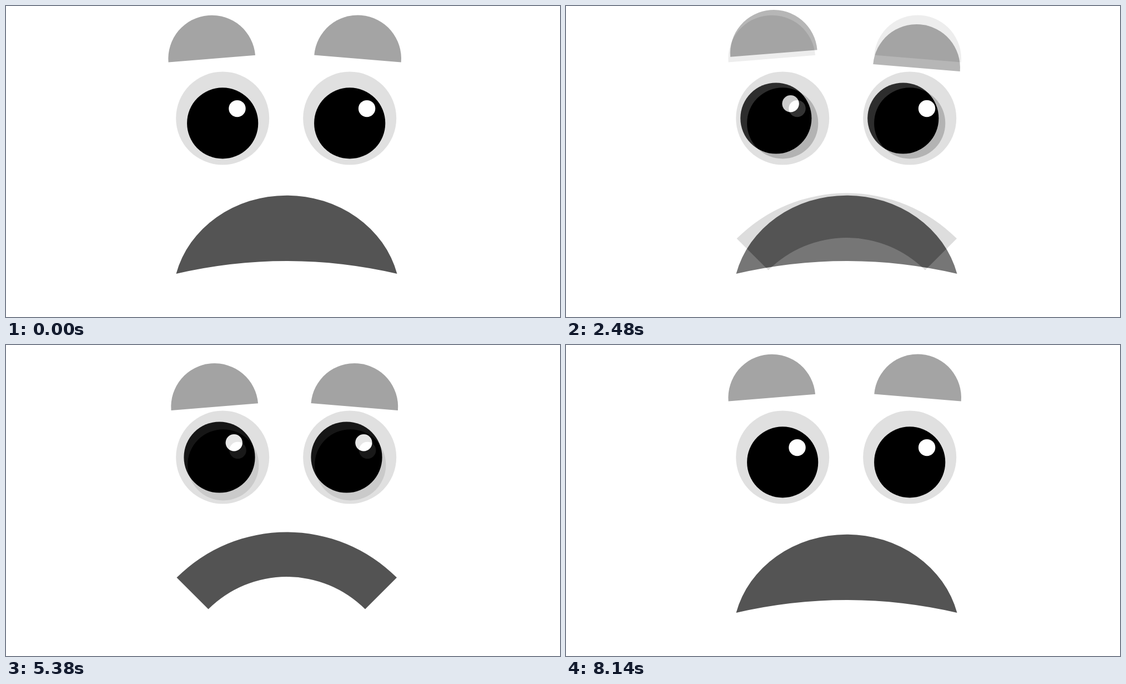
Write an HTML page that moves like this. It is 998 px wide and 561 px high and loops after 8880 ms.

```html
<!DOCTYPE html>
<html lang="en">
<head>
<meta charset="utf-8">
<title>Worried face</title>
<style>
  html, body { margin: 0; width: 100%; height: 100%; overflow: hidden; background: #fff; }
  svg { display: block; width: 998px; height: 561px; }
</style>
</head>
<body>
<svg id="stage" viewBox="0 0 998 561"></svg>
<script>
const LOOP = 8880, FADE = 600;
const EYE_GAP = 229;

const MOUTH = {
  open: 'M306.5 483A205 186 0 0 1 704.5 483Q505.5 437 306.5 483Z',
  arc: 'M307.5 419.6A280.4 280.4 0 0 1 704 419.6L647 476.6A199.8 199.8 0 0 0 364.5 476.6Z'
};

// Brow centres: [left x, left y, right x, right y]
const BROWS = {
  rest: [370.8, 95.2, 633.5, 95],
  tiltLeft: [374.3, 85.5, 631.5, 111.5],
  tiltRight: [375.8, 111.6, 633.5, 76.5],
  low: [375.8, 111.6, 627.7, 111.5],
  lowest: [376.8, 130.4, 626, 130.4],
  wide: [376.9, 111.6, 634.5, 111.5]
};

// Fade start (ms), left pupil x, y, brows, mouth, steps, fixed right glint
const POSES = [
  { at: 0,    x: 390.2, y: 211.4, brows: 'rest', mouth: 'open' },
  { at: 200,  x: 408,   y: 202.5, brows: 'rest', mouth: 'open' },
  { at: 940,  x: 390.2, y: 211.4, brows: 'rest', mouth: 'open' },
  { at: 1680, x: 378.3, y: 202.5, brows: 'tiltLeft', mouth: 'open', glint: [650, 185] },
  { at: 2420, x: 390.2, y: 211.4, brows: 'rest', mouth: 'arc' },
  { at: 3160, x: 390.2, y: 187.7, brows: 'tiltRight', mouth: 'arc' },
  { at: 3900, x: 404,   y: 202.5, brows: 'tiltRight', mouth: 'arc' },
  { at: 4640, x: 384.5, y: 202.5, brows: 'low', mouth: 'arc' },
  { at: 5380, x: 391.3, y: 216.3, brows: 'low', mouth: 'arc' },
  { at: 6120, x: 391.2, y: 202.5, brows: 'lowest', mouth: 'arc' },
  { at: 6920, x: 391.2, y: 202.5, brows: 'wide', mouth: 'arc', steps: 5 },
  { at: 7600, x: 390.2, y: 211.4, brows: 'rest', mouth: 'open' }
];

const disc = (x, y, r, fill) => `<circle cx="${x}" cy="${y}" r="${r}" fill="${fill}"/>`;

const brow = (x, y, turn) =>
  `<path d="M-78.5 0A78.5 78.5 0 0 1 78.5 0Z" fill="#a4a4a4" transform="translate(${x} ${y}) rotate(${turn})"/>`;

function face({ x, y, brows, mouth, glint }) {
  const [lx, ly, rx, ry] = BROWS[brows];
  const [gx, gy] = glint || [x + EYE_GAP + 30.9, y - 26.3];
  return '<rect width="998" height="561" fill="#fff"/>' +
    disc(390.2, 202.5, 84, '#e0e0e0') +
    disc(390.2 + EYE_GAP, 202.5, 84, '#e0e0e0') +
    disc(x, y, 64.1, '#000') +
    disc(x + EYE_GAP, y, 64.1, '#000') +
    disc(x + 26.3, y - 26.3, 15.2, '#fff') +
    disc(gx, gy, 15.2, '#fff') +
    brow(lx, ly, -4.65) + brow(rx, ry, 4.75) +
    `<path d="${MOUTH[mouth]}" fill="#545454"/>`;
}

const stage = document.getElementById('stage');
stage.innerHTML = POSES.map(pose => `<g>${face(pose)}</g>`).join('');

// Each pose fades in, in even steps, over the ones before it
POSES.forEach(({ at, steps = 10 }, i) => {
  if (!i) return;
  stage.children[i].animate([
    { opacity: 0, offset: 0 },
    { opacity: 0, offset: at / LOOP, easing: `steps(${steps}, start)` },
    { opacity: 1, offset: (at + FADE) / LOOP },
    { opacity: 1, offset: 1 }
  ], { duration: LOOP, iterations: Infinity });
});
</script>
</body>
</html>
```
